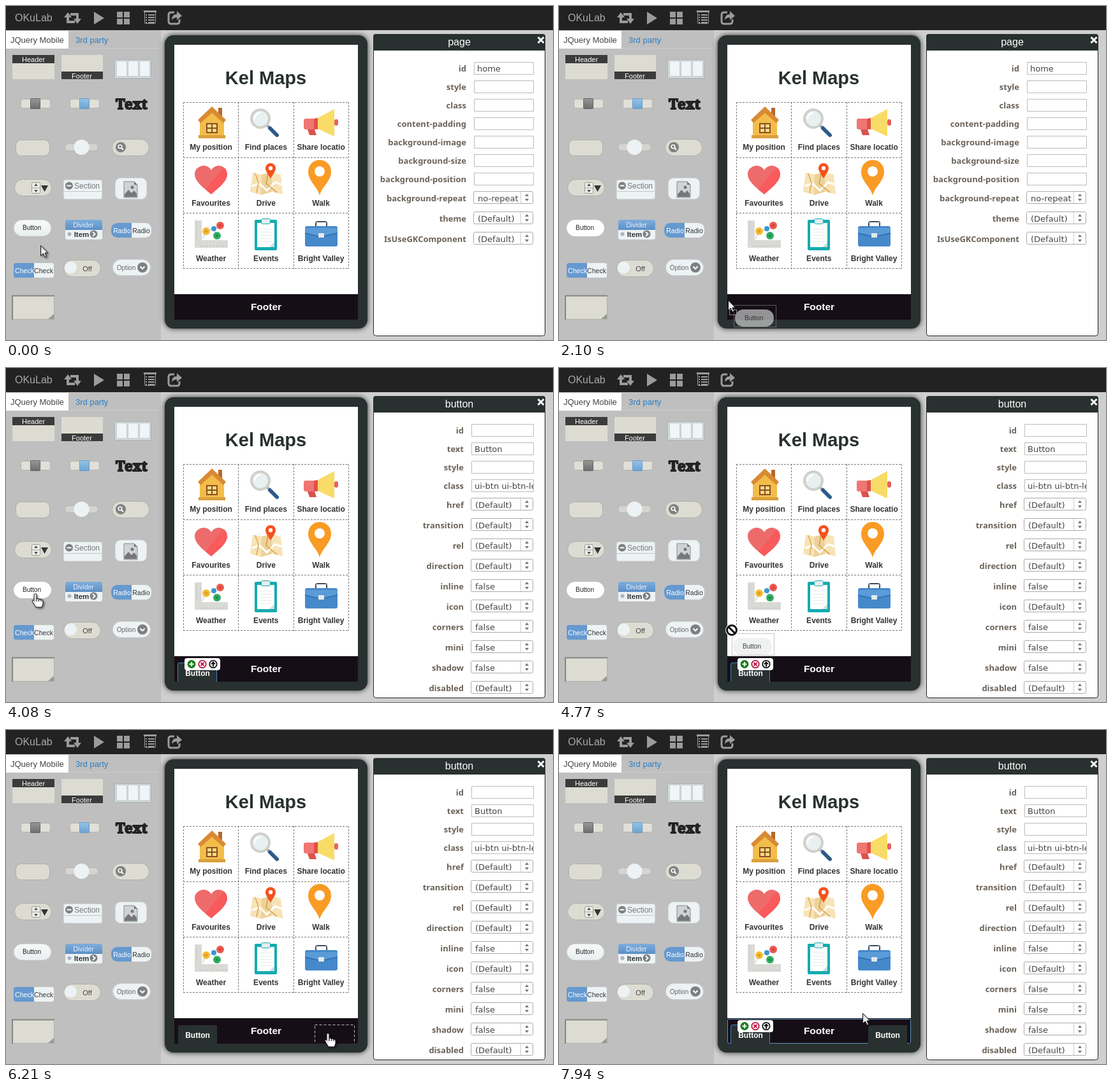
An HTML page with a canvas that plays this animation: 858x525 px, repeating every 8000 ms.

```html
<!DOCTYPE html>
<html lang="en">
<head>
<meta charset="utf-8">
<title>Mobile page builder</title>
<style>
html, body { margin: 0; width: 100%; height: 100%; overflow: hidden; background: #cfcfcf; }
canvas { display: block; }
</style>
</head>
<body>
<canvas id="stage" width="858" height="525"></canvas>
<script>
const c = document.getElementById('stage').getContext('2d');
const LOOP = 8000;
const SANS = '"Liberation Sans", Arial, sans-serif';
const BEIGE = '#dcdcd2', DARK = '#283130', BLUE = '#6699cf', PALE = '#edf2f4';

// ---- helpers ----
function paint(fill, stroke, width = 1) {
  if (fill) { c.fillStyle = fill; c.fill(); }
  if (stroke) { c.strokeStyle = stroke; c.lineWidth = width; c.stroke(); }
}
function box(x, y, w, h, fill, r = 0, stroke) {
  c.beginPath();
  if (stroke) c.roundRect(x + .5, y + .5, w - 1, h - 1, r);
  else c.roundRect(x, y, w, h, r);
  paint(fill, stroke);
}
function disc(x, y, r, fill, stroke, width) {
  c.beginPath();
  c.arc(x, y, r, 0, 7);
  paint(fill, stroke, width);
}
function poly(points, fill, stroke, width, open) {
  c.beginPath();
  for (let i = 0; i < points.length; i += 2) c.lineTo(points[i], points[i + 1]);
  if (!open) c.closePath();
  paint(fill, stroke, width);
}
const line = (points, stroke, width = 1) => poly(points, null, stroke, width, true);
function shape(d, fill, stroke, width) {
  const p = new Path2D(d);
  if (fill) { c.fillStyle = fill; c.fill(p); }
  if (stroke) { c.strokeStyle = stroke; c.lineWidth = width || 1; c.stroke(p); }
}
function text(s, x, y, size, color, align = 'center', weight = '', family = SANS) {
  c.font = `${weight} ${size}px ${family}`;
  c.textAlign = align;
  c.fillStyle = color;
  c.fillText(s, x, y);
}
function dashed(x, y, w, h, color) {
  c.setLineDash([4, 3]);
  box(x, y, w, h, null, 0, color);
  c.setLineDash([]);
}
function fade(y0, y1, a, b) {
  const g = c.createLinearGradient(0, y0, 0, y1);
  g.addColorStop(0, a);
  g.addColorStop(1, b);
  return g;
}
function at(x, y, draw) {
  c.save();
  c.translate(x, y);
  draw();
  c.restore();
}

// ---- top bar ----
function topBar() {
  box(0, 0, 858, 38, '#222');
  text('OKuLab', 14, 24, 16, '#aaa', 'left');
  const g = '#9b9b9b';
  line([97, 14, 97, 25, 108, 25], g, 4);
  line([101, 13, 112, 13, 112, 24], g, 4);
  poly([91, 18, 97, 10, 103, 18], g);
  poly([106, 20, 118, 20, 112, 28], g);
  poly([138, 9, 154, 19, 138, 29], g);
  for (const x of [174, 185]) for (const y of [9, 20]) box(x, y, 9, 9, g);
  box(217, 8, 18, 20, null, 1, g);
  box(216, 7, 20, 3, g);
  for (const y of [13, 17, 21, 25]) {
    box(219, y, 2, 2, g);
    box(223, y, 10, 2, g);
  }
  shape('M264 10H259Q255 10 255 14V24Q255 28 259 28H268Q272 28 272 24V21', null, g, 3);
  shape('M260 22Q260 13 268 13V8L276 15.5L268 22V18Q263 18 260 22Z', g);
}

// ---- widget palette ----
function pill(x, y, w, h, fill, r = 13) {
  box(x, y, w, h, fill, r, '#aeaea8');
}
function chevron(x, y, r, turn) {
  disc(x, y, r, '#7d7f80');
  at(x, y, () => {
    c.rotate(turn);
    line([-1.5, -3.5, 2, 0, -1.5, 3.5], '#fff', 2);
  });
}
function pair(label, x, y, r) {
  box(x, y, 63, 23, PALE, r);
  c.beginPath();
  c.roundRect(x, y, 32, 23, [r, 0, 0, r]);
  paint(BLUE);
  text(label, x + 17, y + 15.5, 10.5, '#fff');
  text(label, x + 47, y + 15.5, 10.5, '#333');
}
function navbar(x, color) {
  box(x, 146, 47, 15, '#e0e0d8', 3, '#b4b4ae');
  box(x + 15, 145, 16, 17, fade(145, 162, color[0], color[1]), 1, color[2]);
}
function paletteButton(hover) {
  box(12, 336, 59, 26, hover ? '#fff' : fade(336, 362, '#f8fafa', '#e9eeee'), 13, hover ? '#fff' : '#dbdfdf');
  text('Button', 40.5, 352, 10, '#222');
}
function palette(hover) {
  box(0, 38, 243, 487, '#bfbfbf');
  box(0, 39, 98, 28, '#fff');
  line([98, 66.5, 243, 66.5], '#cdcdcd');
  text('JQuery Mobile', 7, 58, 13, '#444', 'left');
  text('3rd party', 109, 58, 13, '#2a7fc4', 'left');

  box(10, 77, 66, 38, BEIGE);
  box(10, 77, 66, 13, '#3b3b3b');
  text('Header', 43, 87.5, 11, '#fff');
  box(87, 77, 65, 38, BEIGE);
  box(87, 103, 65, 12, '#3b3b3b');
  text('Footer', 119, 113.5, 11, '#fff');
  box(170, 84, 58, 30, '#d7dcde', 1, '#aab0b3');
  for (const x of [173, 191, 209]) box(x, 86, 17, 25, '#f0f6f8', 0, '#c3cacd');

  navbar(23, ['#999', '#6c6c6c', '#666']);
  navbar(100, ['#96c4e6', '#6ba3d4', '#6a9ac4']);
  c.lineJoin = 'round';
  c.font = '900 22px "Noto Serif", serif';
  c.strokeStyle = '#222';
  c.lineWidth = 2;
  c.textAlign = 'center';
  c.strokeText('Text', 197, 161.5);
  text('Text', 197, 161.5, 22, '#222', 'center', '900', '"Noto Serif", serif');
  c.lineJoin = 'miter';

  pill(15, 210, 54, 26, BEIGE, 8);
  box(92, 216, 53, 12, '#d4d5d0', 6, '#b8b8b3');
  disc(118.5, 222, 12, PALE);
  pill(166, 209, 59, 27, BEIGE);
  disc(180, 222, 8, '#7f8080');
  disc(179, 221, 2.8, null, '#fff', 1.6);
  line([181, 223, 184, 226], '#fff', 2);

  pill(13, 272, 59, 27, BEIGE);
  box(40, 277, 14, 18, '#efefea', 2, '#999');
  line([40, 286, 54, 286], '#999');
  poly([47, 279, 50, 283, 44, 283], '#555');
  poly([44, 289, 50, 289, 47, 293], '#555');
  poly([55, 282, 66, 282, 60.5, 292], '#333');
  box(90, 273, 61, 31, PALE, 3, '#d5dadc');
  line([91, 291.5, 150, 291.5], '#c3c8c9');
  disc(99, 282.5, 6, '#7d7f80');
  box(95.5, 281.5, 7, 2, '#fff');
  text('Section', 127, 287, 12, '#777');
  box(171, 270, 50, 34, PALE, 8, '#d5dadb');
  poly([185, 276, 201, 276, 206, 281, 206, 301, 185, 301], '#cfd3d3', '#858888');
  poly([201, 276, 201, 281, 206, 281], '#777');
  poly([186, 300, 186, 296, 192, 289, 197, 294, 201, 290, 205, 295, 205, 300], '#777');
  disc(198, 285, 2.5, '#777');

  paletteButton(hover);
  box(93, 336, 58, 31, PALE, 3);
  box(93, 336, 58, 16, fade(336, 352, '#7fadda', '#5b8fc8'), [3, 3, 0, 0]);
  text('Divider', 121.5, 348, 10.5, '#e8f1fa');
  disc(99.5, 358.5, 3, '#a7b4c2');
  text('Item', 118.5, 362.5, 11.5, '#333', 'center', 'bold');
  chevron(137.5, 358.5, 6, 0);
  pair('Radio', 165, 341, 9);

  pair('Check', 12, 404, 3);
  pill(90, 399, 59, 27, BEIGE);
  disc(101.5, 411, 9.5, PALE);
  text('Off', 127.5, 417, 11, '#444');
  box(167, 398, 60, 26, PALE, 13, '#d0d5d5');
  text('Option', 188.5, 414.5, 10, '#666');
  chevron(214, 411, 8, Math.PI / 2);

  box(10, 455, 66, 38, BEIGE, 0, '#b0b0aa');
  line([10, 493, 10, 455.5, 76, 455.5], '#858580', 2);
  poly([75, 484, 75, 492, 66, 492], '#999');
}

// ---- app icons ----
const icons = [
  function house() {
    box(333, 160, 6, 14, '#b5692b');
    poly([304, 180, 323, 163, 342, 180, 342, 208, 304, 208], '#f3bd4a');
    poly([323, 158, 345, 179, 341, 184, 323, 168, 305, 184, 301, 179], '#d98a34');
    box(302, 203, 42, 5, '#d9a03c');
    box(314, 184, 18, 16, '#8a4f22');
    for (const x of [316, 324]) for (const y of [186, 193]) box(x, y, 6, 5, '#f9d984');
  },
  function lens() {
    line([409, 187, 413, 191], '#9aa5ab', 4);
    c.lineCap = 'round';
    line([414, 192, 425, 203], '#2d5b88', 6);
    c.lineCap = 'butt';
    disc(399, 177, 14, '#e9f0f1', '#cfd0c9', 4);
    shape('M390 178A9 9 0 0 1 399 168', null, '#fff', 2.5);
  },
  function megaphone() {
    poly([472, 191, 483, 191, 487, 203, 476, 203], '#d9534f');
    box(515, 178, 6, 10, '#e8605f', 3);
    box(467, 177, 24, 17, '#f07673', 3);
    poly([489, 176, 515, 162, 515, 205, 489, 193], '#f9dc67');
    poly([483, 177, 489, 176, 489, 193, 483, 194], '#e34f4c');
  },
  function heart() {
    const d = 'M322 296C310 286 296 276 296 264C296 252 314 245 322 258C330 245 347 252 347 264C347 276 333 286 322 296Z';
    shape(d, '#ee6b6b');
    c.save();
    c.clip(new Path2D(d));
    poly([345, 249, 350, 300, 305, 298], '#f95a5c');
    c.restore();
  },
  function drive() {
    poly([387, 262, 401, 265, 417, 261, 431, 265, 434, 296, 417, 292, 400, 297, 383, 292], '#f7e3b6');
    poly([401, 265, 417, 261, 417, 292, 400, 297], '#ecd29a');
    line([386, 283, 398, 279, 409, 290, 422, 277, 433, 281], '#fff', 3);
    line([391, 263, 396, 278, 393, 294], '#e0a750', 1.5);
    line([411, 263, 408, 279, 425, 293], '#d99a43', 1.5);
    shape('M415 271C410 263 407 259 407 255A8 8 0 0 1 423 255C423 259 420 263 415 271Z', '#f4511e');
    disc(415, 255, 3.2, '#fff');
  },
  function walk() {
    shape('M492 298C489 284 474 276 474 260A18 18 0 0 1 510 260C510 276 495 284 492 298Z', '#f99b24');
    disc(492, 260, 8, '#fff');
  },
  function weather() {
    poly([296, 337, 307, 337, 307, 368, 348, 368, 348, 380, 296, 380], '#d9d9d6');
    for (let i = 0; i < 7; i++) line([298, 340.5 + i * 4, 301, 340.5 + i * 4], '#c2c2c0');
    for (let i = 0; i < 9; i++) line([305.5 + i * 5, 376, 305.5 + i * 5, 379], '#c2c2c0');
    line([308, 366, 314, 354, 326, 351, 336, 345], '#a9c7d8');
    line([326, 351, 331, 361], '#a9c7d8');
    disc(314, 354, 6, '#f6bd35');
    disc(314, 354, 2.5, '#e29a25');
    disc(326, 350, 4, '#3b96d2');
    disc(336, 345, 6, '#ee5a50');
    disc(336, 345, 2.5, '#d6443e');
    disc(331, 361, 6, '#32ae62');
    disc(331, 361, 2.5, '#22924c');
  },
  function events() {
    box(390, 336, 35, 48, '#14abb0', 2);
    box(394, 341, 27, 38, '#fff');
    poly([421, 371, 421, 379, 413, 379], '#c9dfe0');
    box(400, 334, 15, 9, '#e3eeee', 2, '#14abb0');
    for (let y = 350; y < 372; y += 5) line([398, y + .5, 417, y + .5], '#e3ecec');
  },
  function briefcase() {
    box(485, 338, 19, 12, null, 2, '#3d4c5c');
    box(486, 339, 17, 11, null, 2, '#3d4c5c');
    box(469, 346, 51, 32, '#4589cb', 3);
    poly([469, 349, 520, 349, 520, 357, 494, 363, 469, 357], '#5a9bd8');
    line([469, 357, 494, 363, 520, 357], '#2f6ba8', 1.5);
    box(490, 357, 9, 7, '#e4e9ec', 1);
  }
];
const apps = ['My position', 'Find places', 'Share locatio', 'Favourites', 'Drive', 'Walk', 'Weather', 'Events', 'Bright Valley'];

// ---- phone ----
function phone() {
  c.save();
  c.shadowColor = 'rgba(0,0,0,.8)';
  c.shadowBlur = 9;
  box(249, 46, 318, 461, DARK, 14);
  c.restore();
  box(264, 61, 288, 432, '#fff');
  text('Kel Maps', 407.5, 123, 29, DARK, 'center', 'bold');
  c.setLineDash([3, 2]);
  for (const x of [278.5, 364.5, 451.5, 537.5]) line([x, 151, x, 413], '#777');
  for (const y of [151.5, 238.5, 325.5, 412.5]) line([278, y, 538, y], '#777');
  c.setLineDash([]);
  apps.forEach((name, i) => {
    icons[i]();
    text(name, 321.5 + i % 3 * 86.3, 226 + Math.floor(i / 3) * 87.5, 12, '#333', 'center', 'bold');
  });
  box(264, 453, 288, 40, '#160e17');
  text('Footer', 408, 478, 15.5, '#fff', 'center', 'bold');
}
function footerButton(x, border) {
  box(x + 1, 464, 61, 29, DARK);
  if (border) shape(`M${x + .5} 493V466Q${x + .5} 463.5 ${x + 3} 463.5H${x + 59}Q${x + 61.5} 463.5 ${x + 61.5} 466V493`, null, border);
  text('Button', x + 31.5, 484, 12, '#fff', 'center', 'bold');
}
function tools(x) {
  box(x, 456, 56, 19, '#fff', 4);
  at(x + 11, 465.5, () => {
    disc(0, 0, 6.5, '#1d7d1d');
    line([-3.5, 0, 3.5, 0], '#fff', 2);
    line([0, -3.5, 0, 3.5], '#fff', 2);
    disc(17, 0, 5.7, '#fff', '#b8123f', 1.8);
    line([14.5, -2.5, 19.5, 2.5], '#b8123f', 2);
    line([14.5, 2.5, 19.5, -2.5], '#b8123f', 2);
    disc(34, 0, 5.7, '#fff', '#111', 1.8);
    line([34, 4, 34, -2], '#111', 2);
    line([31, 0, 34, -3, 37, 0], '#111', 1.8);
  });
}

// ---- property panel ----
const UI = '"DejaVu Sans", Verdana, sans-serif';
const pageInputs = ['id', 'style', 'class', 'content-padding', 'background-image', 'background-size', 'background-position'];
const pageSelects = ['background-repeat', 'theme', 'IsUseGKComponent'];
const buttonInputs = ['id', 'text', 'style', 'class'];
const buttonSelects = ['href', 'transition', 'rel', 'direction', 'inline', 'icon', 'corners', 'mini', 'shadow', 'disabled'];
const values = { 'background-repeat': 'no-repeat', inline: 'false', corners: 'false', mini: 'false', shadow: 'false' };

function fields(x, inputs, selects, filled) {
  const label = (s, y) => text(s, x - 12, y + 5, 13, '#6b6259', 'right', 'bold', '"Noto Sans", sans-serif');
  inputs.forEach((name, i) => {
    const y = 98 + i * 29;
    label(name, y);
    box(x, y - 10, 828 - x, 20, '#fff', 0, '#bbb');
    c.save();
    c.beginPath();
    c.rect(x, y - 10, 827 - x, 20);
    c.clip();
    text(filled[name] || '', x + 5, y + 5, 13, '#444', 'left', '', UI);
    c.restore();
  });
  const top = 98 + inputs.length * 29;
  selects.forEach((name, i) => {
    const y = top + i * 32;
    label(name, y + 1);
    box(x - 1, y - 10, 828 - x, 20, '#fff', 2, '#aaa');
    line([807.5, y - 9, 807.5, y + 9], '#ccc');
    poly([817, y - 6, 820, y - 2, 814, y - 2], '#777');
    poly([814, y + 2, 820, y + 2, 817, y + 6], '#777');
    text(values[name] || '(Default)', x + 6, y + 6, 13, '#444', 'left', '', UI);
  });
}
function panel(kind, side) {
  box(576, 44, 270, 475, '#fff', 4, '#222');
  box(576, 44, 270, 26, DARK, [4, 4, 0, 0]);
  text(kind, 711, 62, 16, '#fff');
  line([834.5, 49, 843.5, 58], '#fff', 3);
  line([834.5, 58, 843.5, 49], '#fff', 3);
  if (kind === 'page') fields(734, pageInputs, pageSelects, { id: 'home' });
  else fields(730, buttonInputs, buttonSelects, { text: 'Button', class: 'ui-btn ui-btn-' + side });
}

// ---- pointer ----
const path = [
  [0, 54, 376], [540, 54, 376], [780, 46, 355], [1320, 46, 355], [1620, 119, 386],
  [2160, 283, 471], [2220, 287, 474], [2560, 287, 474], [2740, 296, 479], [3540, 296, 479],
  [4080, 46, 355], [4350, 46, 355], [5190, 478, 463], [5310, 491, 467], [5490, 505, 477],
  [6490, 505, 477], [7090, 308, 475], [7760, 308, 475], [7940, 476, 445]
];
// The pointer advances in 60 ms ticks.
function pointer(t) {
  const i = path.findIndex(p => p[0] > t);
  if (i < 0) return path[path.length - 1].slice(1);
  const [t0, x0, y0] = path[i - 1], [t1, x1, y1] = path[i];
  const tick = Math.max(t0, t1 - Math.ceil((t1 - t) / 60) * 60);
  const k = (tick - t0) / (t1 - t0);
  return [Math.round(x0 + (x1 - x0) * k), Math.round(y0 + (y1 - y0) * k)];
}
function cursor(kind, x, y) {
  at(x, y, () => {
    if (kind === 'denied') {
      disc(9, 3, 7.5, 'rgba(255,255,255,.55)', '#fff', 5);
      disc(9, 3, 7.5, null, '#111', 3);
      line([4, -2, 14, 8], '#111', 3);
      return;
    }
    c.shadowColor = 'rgba(0,0,0,.4)';
    c.shadowBlur = 3;
    c.shadowOffsetX = c.shadowOffsetY = 2;
    if (kind === 'hand') {
      poly([-2, 1, 0, -.5, 2, 1, 2, 8, 4, 7, 6, 8.5, 8, 8, 9, 9.5, 11, 9.5, 12, 11, 12, 16, 10, 21, 1, 21, -3, 15, -5, 11, -4, 9.5, -2, 11], '#fff', '#111');
      c.shadowColor = 'transparent';
      for (const dx of [2, 5.5, 9]) line([dx, 8, dx, 12], '#111');
      return;
    }
    poly([.5, .5, .5, 16.5, 4.5, 13, 7, 19, 9.5, 18, 7, 12, 11.5, 12], '#fff', '#111');
    c.shadowColor = 'transparent';
    if (kind === 'move') {
      box(2, 15, 12, 9, null, 0, '#111');
      c.setLineDash([1, 1]);
      box(2, 15, 12, 9, null, 0, '#fff');
      c.setLineDash([]);
    }
  });
}
function ghost(x, y) {
  at(x, y, () => {
    box(9, 8, 67, 35, null, 0, 'rgba(150,150,150,.55)');
    c.globalAlpha = .6;
    box(11, 15, 61, 27, '#e6e9e8', 13);
    c.globalAlpha = .85;
    text('Button', 40.5, 31.5, 10, '#222');
  });
}

// ---- scene ----
function draw(t) {
  const during = (a, b) => t >= a && t < b;
  const [x, y] = pointer(t);
  const drag = during(1380, 3140) || during(4410, 6150);
  const dropped = during(3140, 3600) || during(6150, 6540);
  const onSource = x > 12 && x < 71 && y > 336 && y < 362;
  const onScreen = x > 264 && x < 552 && y > 61 && y < 493;
  const onLeft = x > 269 && x < 331 && y > 463;
  const onRight = x > 484 && x < 546 && y > 463;
  const side = during(6340, 7490) ? 'right' : 'left';

  box(0, 0, 858, 525, '#cfcfcf');
  topBar();
  palette(drag || onSource);
  phone();

  c.save();
  c.beginPath();
  c.rect(264, 61, 288, 432);
  c.clip();
  if (!drag && !dropped && onScreen && y > 440 && !onLeft && !onRight) box(264, 454, 288, 39, null, 2, '#5b93bb');
  if (during(2620, 3270)) dashed(269, 463, 63, 40, '#bbb');
  if (during(5250, 5370)) dashed(370, 424, 75, 40, '#8fc0dd');
  if (during(5370, 6340)) dashed(484, 463, 63, 40, '#bbb');
  const picked = t >= 3270 && !during(5250, 6340);
  if (t >= 3270) {
    const hover = during(6900, 7290) && onLeft;
    footerButton(269, picked && side === 'left' ? '#3f87bd' : hover && '#b5c4cc');
  }
  if (t >= 6340) footerButton(484, side === 'right' && '#3f87bd');
  if (picked) tools(side === 'left' ? 280 : 483);
  c.restore();

  panel(t < 3270 ? 'page' : 'button', side);

  if (drag) ghost(x, y);
  cursor(drag ? (onScreen ? 'move' : 'denied') : onSource || dropped ? 'hand' : 'arrow', x, y);
}
function frame() {
  draw(performance.now() % LOOP);
  requestAnimationFrame(frame);
}
frame();
</script>
</body>
</html>
```
